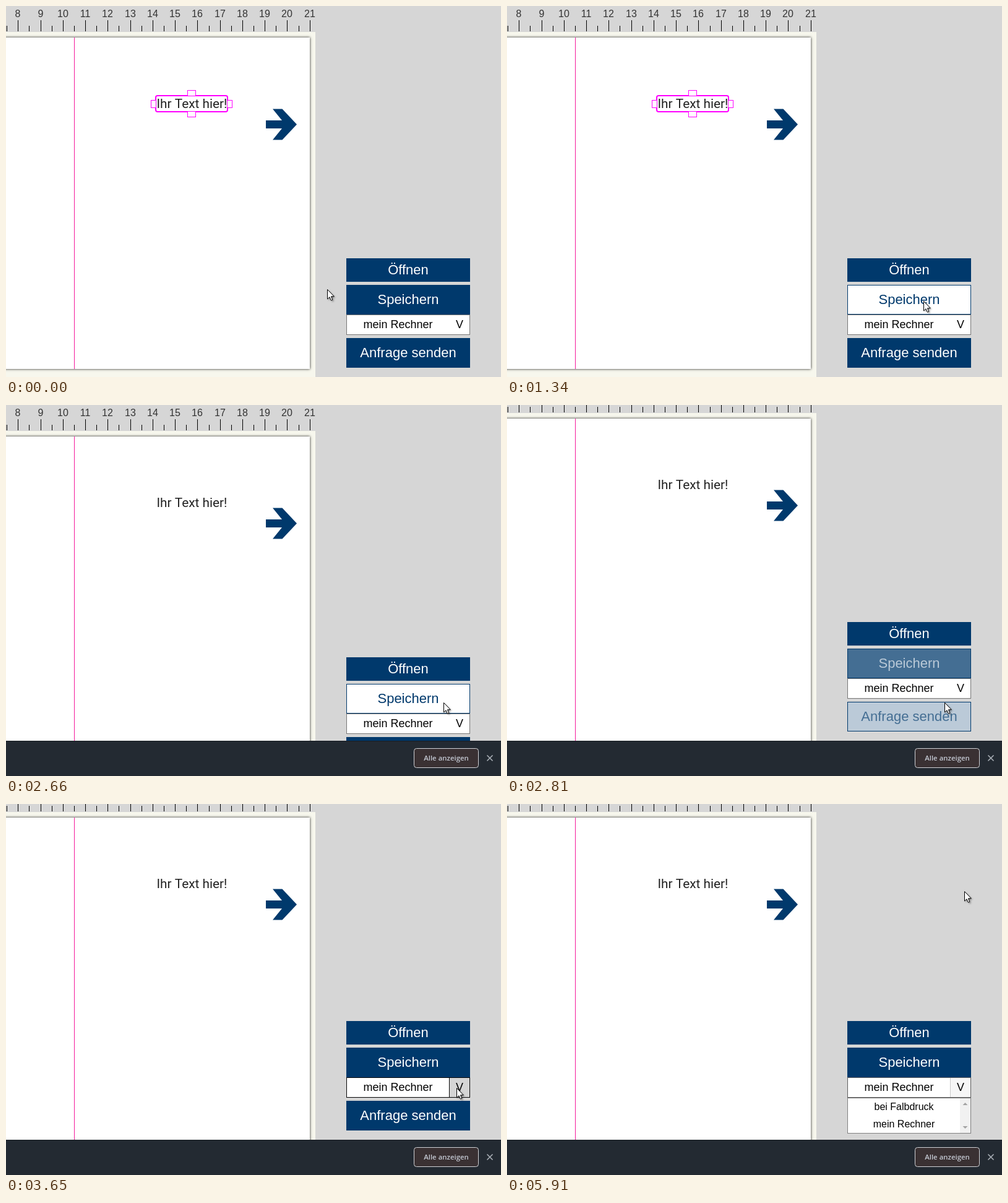
Write an HTML page with a canvas that moves like this. It is 800x600 px and loops after 5940 ms.

```html
<!DOCTYPE html>
<html lang="de">
<head>
<meta charset="utf-8">
<title>Speichern</title>
<style>
  html, body { margin: 0; width: 100%; height: 100%; overflow: hidden; background: #d6d6d6; }
  canvas { display: block; width: 800px; height: 600px; }
</style>
</head>
<body>
<canvas id="stage" width="800" height="600"></canvas>
<script>
const ctx = document.getElementById('stage').getContext('2d');
const LOOP = 5940;
const ARIAL = '"Liberation Sans", Arial, sans-serif';
const gray = v => [v, v, v];
const NAVY = [0, 57, 108], WHITE = gray(255), BLACK = gray(0);
const PRESSED = [58, 155, 224], PRESSED_TEXT = [172, 200, 218];

// when the pointer sets off, for how long, and where to
const HOME = { x: 519, y: 458 };
const MOVES = [
  { at: 30, dur: 260, x: 736, y: 479 },
  { at: 290, dur: 190, x: 673, y: 477 },
  { at: 1500, dur: 400, x: 707, y: 481 },
  { at: 3290, dur: 450, x: 730, y: 457 },
  { at: 5760, dur: 150, x: 739, y: 141 }
];

const clamp = v => Math.max(0, Math.min(1, v));
const lerp = (a, b, p) => a + (b - a) * p;
const smooth = p => p * p * (3 - 2 * p);
const mix = (a, b, p) => a.map((v, i) => lerp(v, b[i], p));
const rgb = c => `rgb(${c.map(Math.round).join(',')})`;

// CSS "ease" curve
function ease(x) {
  if (x <= 0 || x >= 1) return clamp(x);
  let lo = 0, hi = 1, s = 0.5;
  const bez = (a, b) => 3 * (1 - s) * (1 - s) * s * a + 3 * (1 - s) * s * s * b + s * s * s;
  for (let i = 0; i < 18; i++) {
    s = (lo + hi) / 2;
    if (bez(0.25, 0.25) < x) lo = s; else hi = s;
  }
  return bez(0.1, 1);
}
const fade = (t, start, dur = 300) => ease(clamp((t - start) / dur));

function pointerAt(t) {
  let { x, y } = HOME;
  for (const m of MOVES) {
    const p = smooth(clamp((t - m.at) / m.dur));
    x = lerp(x, m.x, p);
    y = lerp(y, m.y, p);
  }
  return [Math.round(x), Math.round(y)];
}

function rect(x, y, w, h, color) {
  ctx.fillStyle = color;
  ctx.fillRect(x, y, w, h);
}

function frame(x, y, w, h, color) {
  ctx.strokeStyle = color;
  ctx.lineWidth = 1;
  ctx.strokeRect(x + 0.5, y + 0.5, w - 1, h - 1);
}

function label(str, x, y, font, color) {
  ctx.font = font;
  ctx.fillStyle = color;
  ctx.textAlign = 'center';
  ctx.fillText(str, x, y);
}

function shape(points) {
  ctx.beginPath();
  points.forEach(([x, y]) => ctx.lineTo(x, y));
  ctx.closePath();
}

function shifted(dx, dy, draw) {
  ctx.save();
  ctx.translate(dx, dy);
  draw();
  ctx.restore();
}

function drawRuler() {
  for (let half = 15; half <= 42; half++) {
    const x = Math.round(19.3 + (half - 16) * 18.13);
    const major = half % 2 === 0;
    rect(x, major ? 23 : 32, 1, major ? 18 : 9, '#000');
    if (major) label(half / 2, x, 18, '16px ' + ARIAL, '#333');
  }
}

function handle(cx, cy, w, h) {
  rect(cx - w / 2, cy - h / 2, w, h, '#fff');
  frame(cx - w / 2, cy - h / 2, w, h, '#f0f');
}

function drawSelection() {
  ctx.strokeStyle = '#f0f';
  ctx.lineWidth = 2;
  ctx.beginPath();
  ctx.roundRect(242, 145, 116, 26, 3);
  ctx.stroke();
  for (const side of [-1, 1]) {
    handle(300 + 61.5 * side, 158.5, 9, 13);
    handle(300, 158 + 17 * side, 14, 10);
  }
}

function drawArrow() {
  const upper = [[-25, -6.5], [1, -6.5], [-14, -25], [1.5, -25], [25, 0]];
  const lower = upper.map(([x, y]) => [x, -y]).reverse();
  shape([...upper, ...lower]);
  ctx.fillStyle = rgb(NAVY);
  ctx.fill();
}

function drawSheet(selected) {
  drawRuler();
  rect(0, 42, 500, 600, '#f7f7ed');
  ctx.save();
  ctx.shadowColor = 'rgba(0,0,0,0.9)';
  ctx.shadowBlur = 4;
  rect(-20, 51, 511, 536, '#fff');
  ctx.restore();
  rect(110, 51, 1, 536, '#f5189c');
  if (selected) drawSelection();
  label('Ihr Text hier!', 300.4, 165, '20.8px Roboto, sans-serif', '#222');
  shifted(445, 191.5, drawArrow);
}

function button(str, y, h, back, text) {
  rect(550, y, 200, h, rgb(back));
  frame(550, y, 200, h, rgb(NAVY));
  label(str, 650, Math.floor(y + h / 2 + 7.5), '22px ' + ARIAL, rgb(text));
}

function drawSelect(hover) {
  rect(550, 499, 200, 33, '#fff');
  rect(717, 499, 33, 33, rgb(mix(WHITE, gray(211), hover)));
  rect(716, 499, 1, 33, rgb(mix(WHITE, BLACK, hover)));
  frame(550, 499, 200, 33, rgb(mix(gray(118), BLACK, hover)));
  label('mein Rechner', 633.5, 521, '18px ' + ARIAL, '#000');
  label('V', 733, 521, '18px ' + ARIAL, '#000');
}

function drawList() {
  rect(550, 532, 200, 58, '#fff');
  rect(732, 533, 17, 56, '#f1f1f1');
  frame(550, 532, 200, 58, '#808080');
  label('bei Falbdruck', 641.5, 552, '16px ' + ARIAL, '#000');
  label('mein Rechner', 641.5, 580, '16px ' + ARIAL, '#000');
  ctx.fillStyle = '#a3a3a3';
  for (const side of [-1, 1]) {
    const base = 561 + 17 * side;
    shape([[736.5, base], [740.5, base + 4 * side], [744.5, base]]);
    ctx.fill();
  }
}

function drawPanel(t) {
  const save = fade(t, 150) - fade(t, 2680);
  const press = fade(t, 2300, 150) - fade(t, 2450, 200);
  const send = fade(t, 2680) - fade(t, 3345);
  const pick = fade(t, 3430) - fade(t, 5765);
  button('Öffnen', 408, 38, NAVY, WHITE);
  button('Speichern', 451, 48,
    mix(mix(NAVY, WHITE, save), PRESSED, press),
    mix(mix(WHITE, NAVY, save), PRESSED_TEXT, press));
  drawSelect(pick);
  button('Anfrage senden', 537, 48, mix(NAVY, WHITE, send), mix(WHITE, NAVY, send));
  if (t >= 4500) drawList();
}

function drawShelf() {
  rect(0, 543, 800, 57, '#232a32');
  rect(0, 543, 800, 1, '#171c22');
  ctx.beginPath();
  ctx.roundRect(659.5, 555.5, 104, 31, 4);
  ctx.fillStyle = '#3a3133';
  ctx.fill();
  ctx.strokeStyle = '#d0d2d6';
  ctx.lineWidth = 1;
  ctx.stroke();
  label('Alle anzeigen', 711.5, 575, '600 11.4px "Open Sans", sans-serif', '#c5cad4');
  ctx.strokeStyle = '#a9afb6';
  ctx.lineWidth = 1.6;
  ctx.beginPath();
  for (const side of [-1, 1]) {
    ctx.moveTo(782 - 4.5 * side, 566.5);
    ctx.lineTo(782 + 4.5 * side, 575.5);
  }
  ctx.stroke();
}

function drawPointer() {
  shape([[0.5, 0.5], [0.5, 16], [4, 12.7], [6.4, 18.2], [8.8, 17.2], [6.5, 11.8], [11.3, 11.7]]);
  ctx.shadowColor = 'rgba(0,0,0,0.45)';
  ctx.shadowBlur = 3;
  ctx.shadowOffsetX = ctx.shadowOffsetY = 2;
  ctx.fillStyle = '#fff';
  ctx.fill();
  ctx.shadowColor = 'transparent';
  ctx.strokeStyle = '#000';
  ctx.lineWidth = 1;
  ctx.stroke();
}

function render(t) {
  const small = t >= 2680; // the shelf has shortened the window
  const shelf = fade(t, 2480, 160);
  rect(0, 0, 800, 600, '#d6d6d6');
  shifted(0, small ? -29 : 0, () => drawSheet(t < 2300));
  shifted(0, small ? -57 : 0, () => drawPanel(t));
  if (shelf) shifted(0, Math.round(57 * (1 - shelf)), drawShelf);
  shifted(...pointerAt(t), drawPointer);
}

const start = performance.now();
function tick() {
  render((performance.now() - start) % LOOP);
  requestAnimationFrame(tick);
}
tick();
</script>
</body>
</html>
```
